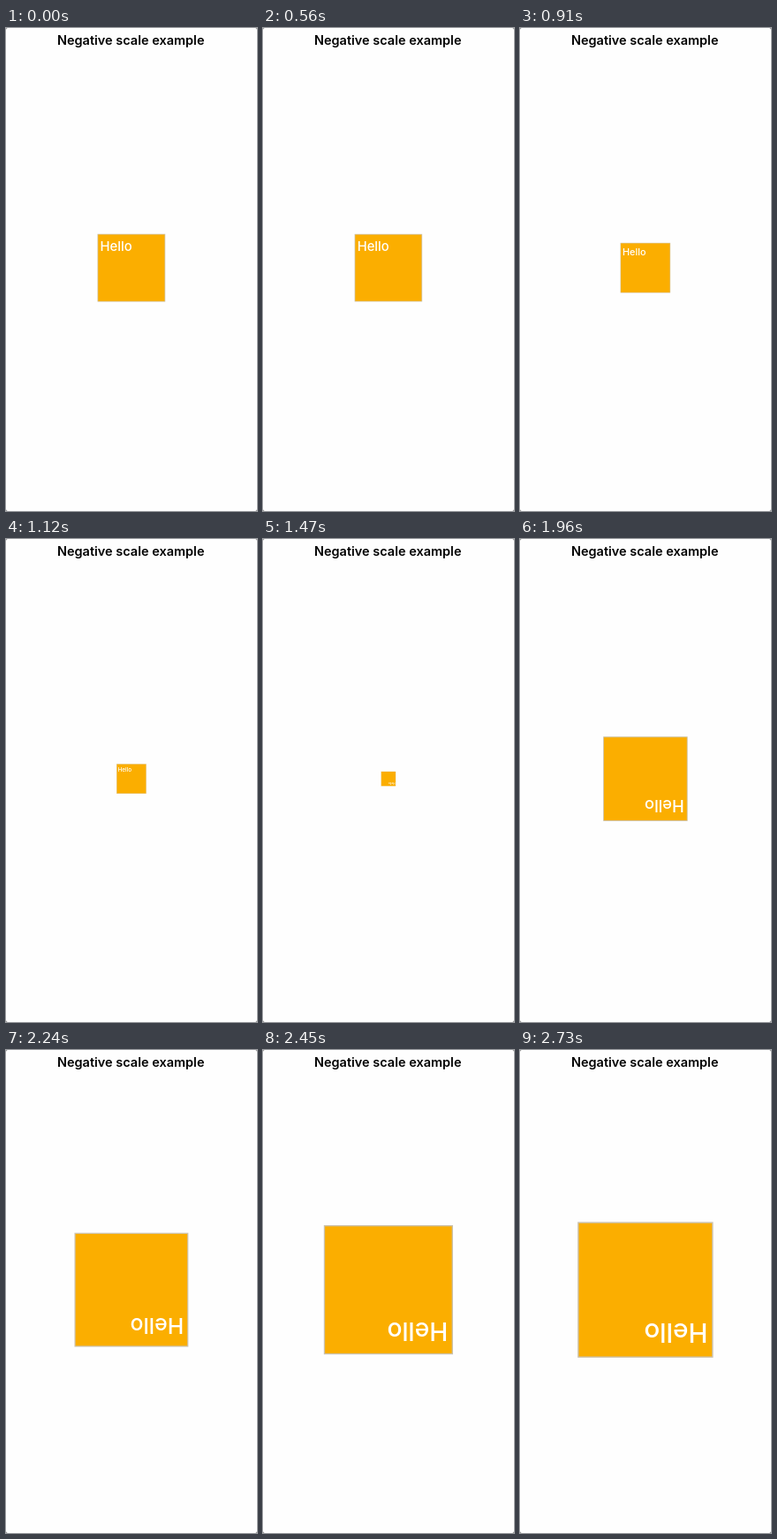
An HTML page for the animation above (2.94 s loop, 284 by 546 pixels).

```html
<!DOCTYPE html>
<html lang="en">
<head>
<meta charset="utf-8">
<title>Negative scale example</title>
<style>
  html, body { margin: 0; width: 100%; height: 100%; overflow: hidden; background: #666; }
  svg { display: block; width: 284px; height: 546px; font-family: Inter, sans-serif; }
</style>
</head>
<body>
<svg viewBox="0 0 284 546">
  <rect width="284" height="546" rx="2" fill="#fefefe"/>
  <text x="141.2" y="19" text-anchor="middle" font-size="14.5" font-weight="600">Negative scale example</text>
  <g id="box">
    <rect x="-38" y="-38" width="76" height="76" fill="#fbae00" stroke="#cbc2ae" stroke-width=".7"/>
    <text x="-35.3" y="-19.2" font-size="14.8" font-weight="500" fill="#fff">Hello</text>
  </g>
</svg>
<script>
const LOOP = 2940, STEP = 70, START = 530, DURATION = 2135;
const box = document.getElementById('box');

// cubic-bezier(.42, 0, 1, 1), solved for x by bisection
function easeIn(x) {
  const y = u => u * u * (3 - 2 * u);
  let lo = 0, hi = 1;
  for (let i = 0; i < 24; i++) {
    const u = (lo + hi) / 2;
    if (1.26 * u * (1 - u) ** 2 + y(u) < x) lo = u; else hi = u;
  }
  return y((lo + hi) / 2);
}

const easeInOut = t => t < .5 ? easeIn(2 * t) / 2 : 1 - easeIn(2 - 2 * t) / 2;

function draw() {
  const time = Math.floor(performance.now() % LOOP / STEP) * STEP;
  const t = Math.min(1, Math.max(0, (time - START) / DURATION));
  const scale = 1 - 3 * easeInOut(t);
  box.setAttribute('transform', `translate(141.9 271.1) scale(${scale.toFixed(4)})`);
  requestAnimationFrame(draw);
}
draw();
</script>
</body>
</html>
```
